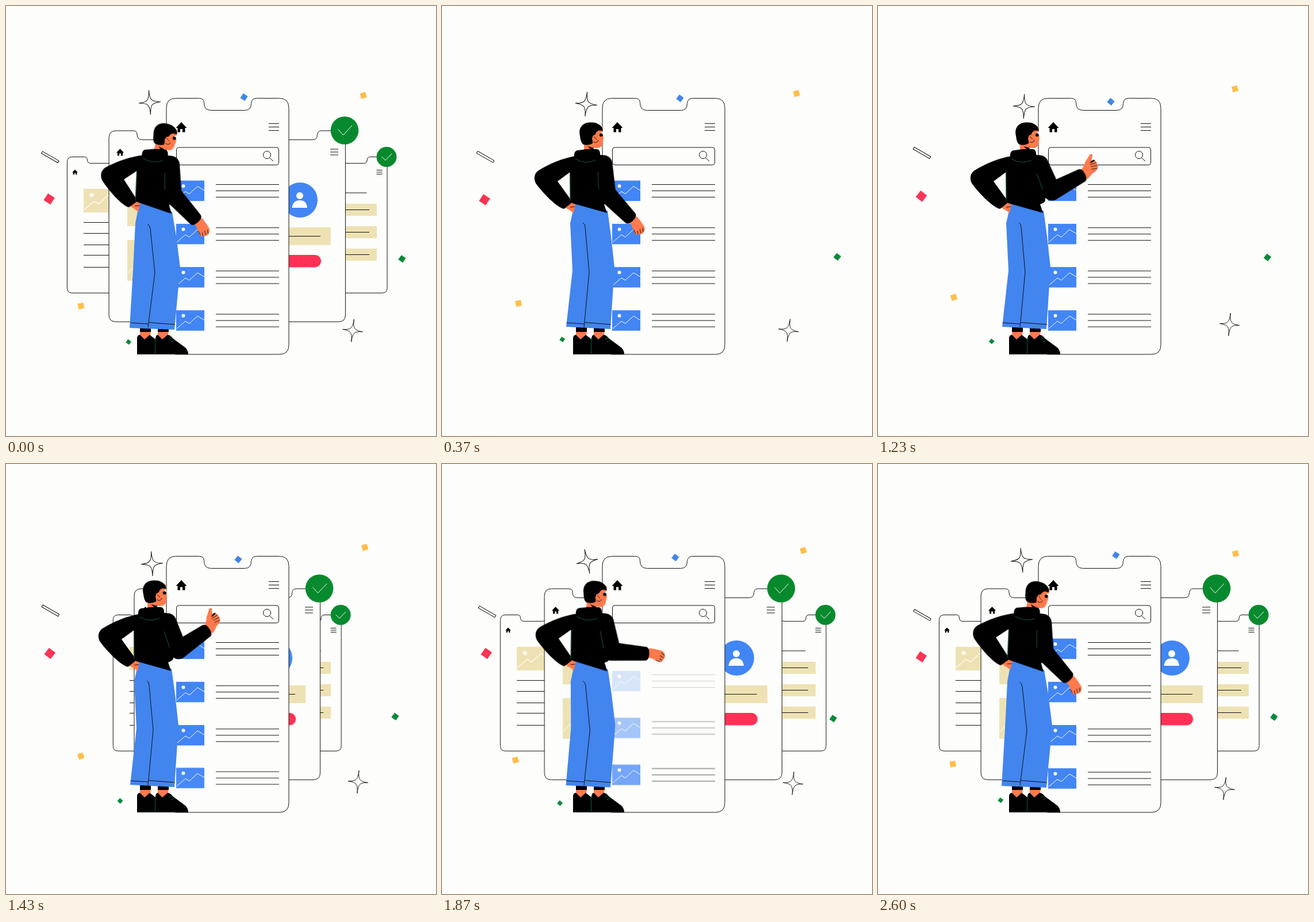
Animation of 748x748 px, one loop 2.63 s. Source, as an HTML page:

```html
<!DOCTYPE html>
<html lang="en">
<head>
<meta charset="utf-8">
<title>Phone search</title>
<style>
html, body { margin: 0; width: 100%; height: 100%; overflow: hidden; background: #fdfdfb; }
svg { display: block; width: 100vw; height: 100vh; }
:root { --loop: 2630ms; }
.line { fill: none; stroke: #111; stroke-width: 1; }
.white { fill: none; stroke: #fff; stroke-width: 1; }
.edge { fill: none; stroke: #14603b; stroke-width: 1; }
.body { fill: #fdfdfb; stroke: #111; stroke-width: 1; vector-effect: non-scaling-stroke; }
.skin { fill: #ff7a4d; }
.blue { fill: #4285f4; }
.beige { fill: #eee2b4; }
.green { fill: #078a2d; }

.mid, .far, .row, .torso, .head, .upper, .fore, .wrist, .up, .down, .pants, .seam {
  animation: var(--loop) infinite ease-in-out;
}
.mid { animation-name: mid; }
.far { animation-name: far; }
@keyframes mid {
  0%, .8% { transform: none; animation-timing-function: ease-in; }
  12.5%, 49% { transform: translateX(var(--d)); animation-timing-function: ease-out; }
  61.5% { transform: translateX(calc(var(--d) * -.071)); }
  75%, 81% { transform: translateX(calc(var(--d) * .006)); }
  97%, 100% { transform: none; }
}
@keyframes far {
  0%, .8% { transform: none; animation-timing-function: ease-in; }
  13%, 49% { transform: translateX(var(--d)); animation-timing-function: ease-out; }
  62% { transform: translateX(calc(var(--d) * -.085)); }
  77%, 81% { transform: translateX(calc(var(--d) * .007)); }
  97%, 100% { transform: none; }
}

.row { animation-name: row; animation-timing-function: linear; }
@keyframes row {
  0%, 54.1%, 73%, 100% { opacity: 1; transform: none; }
  62.6%, 66% { opacity: 0; transform: translateY(-24px); }
}

.torso { animation-name: lean; transform-origin: 235px 350px; }
@keyframes lean {
  0%, 1%, 78%, 100% { transform: translate(1.5px, -1.5px) rotate(3.2deg); }
  12.5%, 15%, 45%, 65% { transform: translate(0, 0) rotate(0deg); }
  30% { transform: translate(.3px, -.3px) rotate(.6deg); }
}
.head { animation-name: head; transform-origin: 260px 222px; }
@keyframes head {
  0%, 1%, 78%, 100% { transform: translate(17px, 2px) rotate(13deg); }
  12.5%, 15%, 46% { transform: translate(0, 0) rotate(0deg); }
  30% { transform: translate(3px, 0) rotate(1deg); }
  62%, 65% { transform: translate(-2px, 0) rotate(-1deg); }
}
.pants { animation-name: pants; }
@keyframes pants {
  0%, 1%, 78%, 100% { d: path("M232 342L225 378L221 460L215 560L293 563L303 455L296 400L289 358Z"); }
  12.5%, 65% { d: path("M231 342L223 378L227 460L216 558L293 562L300 455L294 400L288 356Z"); }
}
.seam { animation-name: seam; }
@keyframes seam {
  0%, 1%, 78%, 100% { d: path("M246 379Q250 381 251 387L259 464L247 559"); }
  12.5%, 65% { d: path("M245 377Q249 379 249 385L256 463L247 559"); }
}

.upper { animation-name: upper; }
@keyframes upper {
  0%, 1%, 79%, 100% { transform: rotate(83deg); }
  12.5%, 36% { transform: rotate(83.5deg); }
  46% { transform: rotate(65.5deg); }
  56%, 64% { transform: rotate(68.5deg); }
}
.fore { animation-name: fore; }
@keyframes fore {
  0%, 1%, 96%, 100% { transform: rotate(-38.7deg); }
  12.5%, 36% { transform: rotate(-37.5deg); }
  46%, 47.5% { transform: rotate(-93.5deg); }
  56%, 64% { transform: rotate(-103.5deg); }
  79%, 81% { transform: rotate(-36.5deg); }
}
.wrist { animation-name: wrist; transform-origin: 352px 287px; }
@keyframes wrist {
  0%, 47.5%, 70%, 100% { transform: rotate(9deg); }
  56%, 64% { transform: rotate(0deg); }
}
.up { animation-name: up; }
.down { animation-name: down; }
@keyframes up {
  0%, 41.4%, 71.1%, 100% { opacity: 0; }
  41.5%, 71% { opacity: 1; }
}
@keyframes down {
  0%, 41.4%, 71.1%, 100% { opacity: 1; }
  41.5%, 71% { opacity: 0; }
}
</style>
</head>
<body>
<svg viewBox="0 0 748 748">
  <defs>
    <path id="phone" class="body" d="M-90 0H-50Q-41 0 -41 8Q-41 21 -29 21H30Q41 21 41 9Q42 0 50 0H90Q106.500 0 106.500 17V429Q106.500 445.500 90 445.500H-90Q-106.500 445.500 -106.500 429V17Q-106.500 0 -90 0Z"/>
    <path id="home" d="M0 -9L9.500 1H6.500V8.500H2V3H-2V8.500H-6.500V1H-9.500Z"/>
    <g id="pic">
      <circle cx="12.500" cy="9.500" r="3" fill="#fff"/>
      <path class="white" d="M1 32L16 19L23 23L37 10L49 17"/>
    </g>
    <path id="spark" class="line" d="M0 -21.500C0 -4 3 -1 19 0C3 1 1 4 0 21.500C0 4 -3 1 -19 0C-3 -1 -1 -4 0 -21.500Z"/>
  </defs>

  <g id="bits"></g>

  <g class="far" style="--d:222px">
    <use href="#phone" transform="translate(163 262.500) scale(.5314)"/>
    <use href="#home" transform="translate(120 289) scale(.5)"/>
    <rect class="beige" x="135" y="318" width="56" height="41"/>
    <use href="#pic" transform="translate(135 318) scale(1.140)"/>
    <path class="line" d="M135 376.500h56m-56 19h56m-56 20h56m-56 18h56m-56 21h56"/>
  </g>
  <g class="far" style="--d:-222px">
    <use href="#phone" transform="translate(606.500 262.500) scale(.5314)"/>
    <path class="line" d="M644.500 285.500h10m-10 3.500h10m-10 3.500h10M585 325h42.500"/>
    <path class="beige" d="M567 344h78v21h-78zM567 383h78v21h-78zM567 422h78v21h-78z"/>
    <path class="line" d="M580 354.500h52m-52 39h52m-52 39h52"/>
    <circle class="green" cx="662" cy="262.500" r="17.500"/>
    <path class="white" d="M653.500 262L660 268.500L671 257"/>
  </g>
  <g class="mid" style="--d:126.500px">
    <use href="#phone" transform="translate(258.500 217) scale(.746)"/>
    <use href="#home" transform="translate(198.500 254.500) scale(.7)"/>
    <path class="beige" d="M211 349h96v34h-96zM211 407h96v71h-96z"/>
    <circle cx="232" cy="426" r="6" fill="#fff"/>
    <path class="white" d="M212 465L240 437L254 446L281 422L306 438"/>
  </g>
  <g class="mid" style="--d:-126.500px">
    <use href="#phone" transform="translate(511 217) scale(.746)"/>
    <path class="line" d="M564 249h14m-14 5h14m-14 5h14"/>
    <circle class="blue" cx="511.500" cy="337.500" r="30.500"/>
    <circle cx="511" cy="330" r="6" fill="#fff"/>
    <path fill="#fff" d="M497.500 351Q499 338 511 338Q523 338 524 351Z"/>
    <path class="beige" d="M457 385h108v31h-108z"/>
    <path class="line" d="M475 400.500h72"/>
    <rect x="474" y="433" width="74" height="21.500" rx="10.750" fill="#ff3154"/>
    <circle class="green" cx="589" cy="216.500" r="24.300"/>
    <path class="white" d="M577.500 214.500L586.500 224.500L602 208"/>
  </g>

  <use href="#phone" transform="translate(385.500 160.500)"/>
  <use href="#home" transform="translate(305 211)"/>
  <path class="line" d="M457 204.500h18m-18 6h18m-18 6h18"/>
  <rect class="line" x="296.500" y="246" width="178" height="30.500" rx="4"/>
  <path class="line" d="M460.500 259a6.500 6.500 0 1 1 -13 0a6.500 6.500 0 1 1 13 0M458.500 264l6.500 6"/>
  <g id="rows"></g>

  <g id="person">
    <path class="skin" d="M233 560h19l-1 13l-10 9l-8 -9zM264 560h19l-1 13l-10 9l-8 -9z"/>
    <path d="M233 559h19v8h-19zM264 559h19v8h-19z"/>
    <path d="M228 606V577Q229 572 233 572L241 580L250 572L264 583V606ZM260 606V578Q261 572 264 572L272 580L281 572Q286 572 290 578L309 592Q317 597 317 606Z"/>
    <path class="edge" d="M259.500 579V605M283 580l7 -3M287 584l7 -3"/>
    <path class="pants" fill="#4285ee" d="M231 342L223 378L227 460L216 558L293 562L300 455L294 400L288 356Z"/>
    <path class="line seam" d="M245 377Q249 379 249 385L256 463L247 559"/>
    <path class="line" d="M216.500 551L247 553M248 550.500L294 554"/>

    <g class="head">
      <path class="skin" d="M247 234L262 210H279L279.500 219L281 229L279.500 240Q277 248 268 247H263L262 256H247Z"/>
      <path d="M253 244L264 247L262 252Z"/>
      <path d="M240 226C236 210 247 202 259 202.500C271 202 280 209 279.500 217L273 216.500Q268 218 267 223L262 226L262 239Q256 243 246 241Q241 238 240 226Z"/>
      <circle class="skin" cx="267" cy="231" r="6"/>
      <path class="line" d="M264 227L269 232M263.500 236Q270 240 272 233"/>
      <ellipse cx="278.300" cy="222" rx="2" ry="3" fill="#fff"/>
      <circle cx="276.800" cy="224.300" r="2.900"/>
    </g>

    <g class="torso">
      <path class="skin" d="M214 350L226 340L232 346L229 360Q224 356 218 353Z"/>
      <path class="line" d="M223 350L231 349"/>
      <path d="M232 261C212 264 185 275 168 286C159 292 159 304 165 311C178 328 196 346 209 352Q213 354 216 350L227 341L201 305L224 288Z"/>
      <path d="M230 262Q222 262 222 280L223 338Q224 343 230 344L287 360L282 345Q292 342 291 336L290 270Q287 259 275 259Z"/>
      <path d="M230 263Q229 251 237 251Q254 248 270 249Q276 250 275 262Q272 270 252 272Q234 271 230 263Z"/>
      <path class="edge" d="M232 266Q250 277 270 267M223 290V339"/>
      <g transform="translate(281 275)">
        <g class="upper">
          <path d="M0 0H52" fill="none" stroke="#000" stroke-width="31" stroke-linecap="round"/>
          <path class="edge" d="M13 11.500L52 13.500"/>
          <g transform="translate(52 0)">
            <g class="fore">
              <g class="down">
                <g transform="rotate(-46) translate(-286.900 -326.700)">
                  <path class="skin" d="M325 376L330 382L335 395Q338 400 342 397Q349 398 351 393Q354 389 352 384L346 375L339 366Z"/>
                  <path class="line" d="M333 389L337 396M340 391L341 397M344 388L346 395M349 386L350 393"/>
                </g>
              </g>
              <g class="up">
                <g transform="rotate(35) translate(-300.100 -323.400)">
                  <g class="wrist">
                    <path class="skin" d="M343 284Q348 276 348 266L352 252Q354 248 357 251L358 263Q364 257 367 261L372 269Q372 276 366 281L360 294Z"/>
                    <path d="M356 265Q360 256 364 259L359 264Z"/>
                    <path class="line" d="M357 268L367 262M360 271L370 266M362 275L371 271"/>
                  </g>
                </g>
              </g>
              <path d="M0 -16L59 -12Q65 -11 65 0Q65 11 59 12L0 16A16 16 0 0 1 0 -16Z"/>
            </g>
          </g>
        </g>
      </g>
    </g>
  </g>
</svg>
<script>
const LOOP = 2630, STAGGER = 49;
const make = (parent, html, cls = '') => {
  const g = document.createElementNS('http://www.w3.org/2000/svg', 'g');
  if (cls) g.setAttribute('class', cls);
  g.innerHTML = html;
  return parent.appendChild(g);
};

const rows = document.getElementById('rows');
for (let i = 0; i < 4; i++) {
  const y = 303.7 + i * 75.2;
  make(rows, `<g transform="translate(296 ${y})">
    <rect class="blue" width="49" height="35.500"/><use href="#pic"/>
    <path class="line" d="M69 6.800h110m-110 11h110m-110 11h110"/></g>`, 'row')
    .style.animationDelay = (3 - i) * STAGGER + 'ms';
}

// Each drift axis: centre, swing, and the loop fraction where it peaks.
const square = (size, color) =>
  `<rect x="${-size / 2}" y="${-size / 2}" width="${size}" height="${size}" fill="${color}"/>`;
const bits = [
  { art: square(14, '#f93455'), x: [75.5, 1.7, .72], y: [333, 4, .13], turn: [35, 2, .5] },
  { art: square(10, '#ffbe4a'), x: [622, 6.6, .74], y: [150, 6, .95], turn: [-15, 2, .2] },
  { art: square(9.5, '#4285e8'), x: [409.2, 5.3, .07], y: [162.5, 4, .47], turn: [37, 3, .4] },
  { art: square(9.5, '#078a3a'), x: [683, 6, .03], y: [439, 4.2, .78], turn: [36, 3, .3] },
  { art: square(10, '#ffbe4a'), x: [130.8, 3.3, .27], y: [514.5, 7.7, .95], turn: [-14, 4, .1] },
  { art: square(7, '#078a3a'), x: [205.5, 7.8, .97], y: [584.5, 5.7, .75], turn: [38, 3, .5] },
  { art: '<rect class="line" x="-16.500" y="-2" width="33" height="4"/>', x: [76.8, 1.8, .75], y: [259, 4, .05], turn: [30, 0, 0] },
  { art: '<use href="#spark"/>', x: [252, 2, .5], y: [171, 4, .4], turn: [-2, 11, .28] },
  { art: '<use href="#spark" transform="scale(.92)"/>', x: [607.5, 5, .57], y: [559, 6, .06], turn: [6, 2, .15] }
];
const layer = document.getElementById('bits');
for (const b of bits) b.el = make(layer, b.art);

const swing = ([mid, size, peak], t) => mid + size * Math.cos(2 * Math.PI * (t - peak));
function draw(now) {
  const t = now % LOOP / LOOP;
  for (const b of bits) {
    b.el.setAttribute('transform',
      `translate(${swing(b.x, t)} ${swing(b.y, t)}) rotate(${swing(b.turn, t)})`);
  }
  requestAnimationFrame(draw);
}
draw(0);
</script>
</body>
</html>
```
